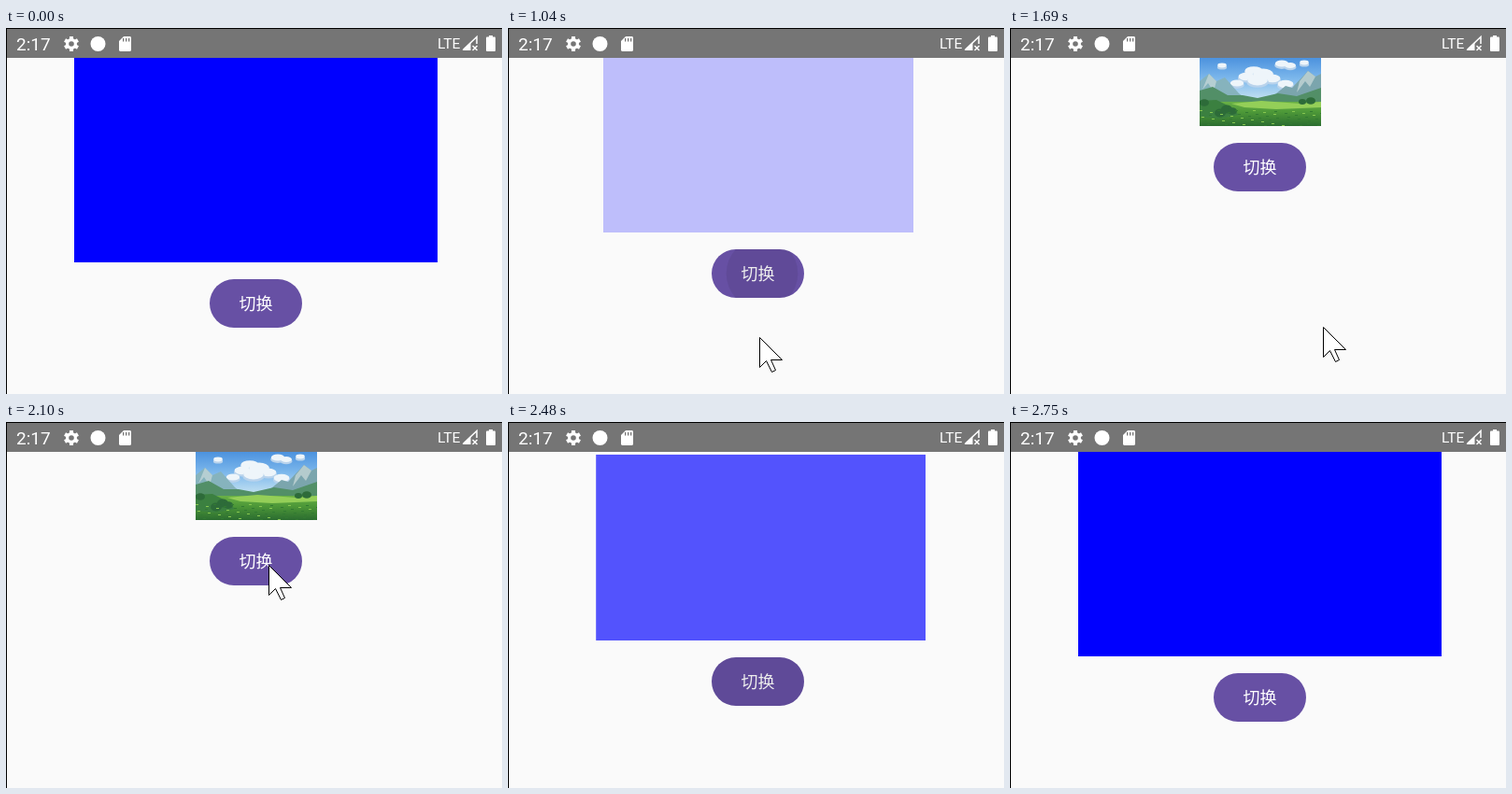
An HTML page with a canvas for the animation above (3390 ms loop, 531 by 392 pixels).

```html
<!DOCTYPE html>
<html lang="zh">
<head>
<meta charset="utf-8">
<title>切换</title>
<style>
html, body { margin: 0; width: 100%; height: 100%; overflow: hidden; background: #fafafa; }
canvas { display: block; }
</style>
</head>
<body>
<canvas id="stage" width="531" height="392"></canvas>
<script>
const ctx = document.getElementById('stage').getContext('2d');
const LOOP = 3390, TOP = 32, MID = 267.5;
const BIG = { w: 389, h: 219 }, SMALL = { w: 130, h: 73 };

const TICKS = [0,
  370, 420, 460, 510, 550, 600, 660, 710, 760, 800,
  990, 1030, 1080, 1120, 1170, 1220, 1260, 1310, 1350, 1400,
  1690, 1740, 1780, 1830, 1870, 1920, 1970, 2010, 2060, 2100, 2150,
  2250, 2290, 2340, 2390, 2430, 2480, 2520, 2570, 2610, 2660, 2700, 2750];

// Pointer visits: [time, x, y]
const VISITS = [
  { end: 1120, keys: [[370, 247, 386], [460, 245, 360], [600, 259, 320], [710, 270, 299],
    [800, 272, 293], [990, 272, 298], [1080, 266, 372]] },
  { end: 2430, keys: [[1690, 335, 320], [1780, 328, 295], [1920, 303, 215], [2060, 283, 160],
    [2150, 279, 145], [2250, 279, 147], [2290, 281, 175], [2340, 285, 270], [2390, 289, 339]] }
];
const PRESSES = [{ at: 985, x: 54, y: 26 }, { at: 2245, x: 62, y: 24 }];
const GROW_CLOCK = [[2297, 0], [2390, 83], [2480, 184], [2750, 454]];

const clamp = v => Math.max(0, Math.min(1, v));
const mix = (a, b, k) => a + (b - a) * k;

function keyed(keys, t, col = 1) {
  if (t <= keys[0][0]) return keys[0][col];
  for (let i = 1; i < keys.length; i++) {
    const a = keys[i - 1], b = keys[i];
    if (t <= b[0]) return mix(a[col], b[col], (t - a[0]) / (b[0] - a[0]));
  }
  return keys[keys.length - 1][col];
}

// cubic-bezier(.4, 0, .2, 1)
function ease(p) {
  p = clamp(p);
  let lo = 0, hi = 1;
  for (let i = 0; i < 20; i++) {
    const s = (lo + hi) / 2, r = 1 - s;
    if (1.2 * r * r * s + 0.6 * r * s * s + s * s * s < p) lo = s; else hi = s;
  }
  return lo * lo * (3 - 2 * lo);
}

// Critically damped spring, stiffness 400
const spring = ms => ms <= 0 ? 0 : 1 - (1 + ms / 50) * Math.exp(-ms / 50);

function poly(c, pts, fill) {
  c.beginPath();
  pts.forEach(([x, y]) => c.lineTo(x, y));
  c.closePath();
  c.fillStyle = fill;
  c.fill();
}

function disc(c, x, y, rx, ry, fill) {
  c.beginPath();
  c.ellipse(x, y, rx, ry, 0, 0, 7);
  c.fillStyle = fill;
  c.fill();
}

function fade(c, y0, y1, ...stops) {
  const g = c.createLinearGradient(0, y0, 0, y1);
  stops.forEach((s, i) => g.addColorStop(i / (stops.length - 1), s));
  return g;
}

function makeMeadow() {
  const cv = document.createElement('canvas');
  cv.width = SMALL.w;
  cv.height = SMALL.h;
  const c = cv.getContext('2d');
  c.fillStyle = fade(c, 0, 45, '#4c92de', '#7db8ec', '#c4e2f2');
  c.fillRect(0, 0, 130, 73);
  for (const [x, y, r] of [[58, 14, 8], [68, 17, 9], [50, 20, 7], [78, 22, 7], [62, 24, 9],
    [88, 6, 6], [97, 8, 5], [40, 27, 6], [92, 28, 7], [24, 8, 4], [112, 5, 4]]) {
    disc(c, x, y + 2, r * 1.3, r * .65, '#b9d3ec');
    disc(c, x, y, r * 1.2, r * .6, '#eef5fa');
  }
  poly(c, [[0, 25], [10, 17], [18, 25], [27, 21], [42, 38], [52, 45], [0, 48]], '#86b3bd');
  poly(c, [[10, 17], [18, 25], [15, 36], [9, 27], [3, 34]], '#b5ced2');
  poly(c, [[76, 43], [92, 30], [99, 32], [116, 14], [124, 20], [130, 17], [130, 48], [76, 48]], '#7ba5ad');
  poly(c, [[116, 14], [124, 20], [118, 31], [113, 25], [104, 37], [107, 25]], '#b4cbcd');
  poly(c, [[0, 35], [14, 31], [30, 40], [46, 40], [62, 43], [84, 38], [104, 41], [130, 32], [130, 55], [0, 55]], '#528f67');
  c.fillStyle = fade(c, 43, 73, '#73b94b', '#4d9838', '#2b6c30');
  c.fillRect(0, 47, 130, 26);
  poly(c, [[34, 49], [66, 46], [108, 49], [130, 47], [130, 53], [82, 55], [48, 53]], '#94cf58');
  poly(c, [[0, 46], [18, 45], [32, 52], [42, 61], [22, 65], [0, 63]], '#3b8040');
  for (const [x, y, r] of [[29, 55, 6], [35, 57, 5], [22, 59, 6], [5, 48, 5], [110, 47, 4], [119, 46, 5]])
    disc(c, x, y, r, r * .75, '#2d6b39');
  for (let i = 0; i < 60; i++) {
    c.fillStyle = i % 3 ? '#327a31' : '#87c650';
    c.fillRect((i * 47) % 130, 56 + (i * 29) % 17, 3, 1);
  }
  return cv;
}
const meadow = makeMeadow();

function panel(size, left, alpha, scale) {
  if (alpha <= 0) return;
  ctx.save();
  ctx.globalAlpha = alpha;
  ctx.translate(left + size.w / 2, TOP + size.h / 2);
  ctx.scale(scale, scale);
  if (size === BIG) {
    ctx.fillStyle = '#00f';
    ctx.fillRect(-size.w / 2, -size.h / 2, size.w, size.h);
  } else {
    ctx.drawImage(meadow, -size.w / 2, -size.h / 2);
  }
  ctx.restore();
}

// Returns the bottom edge of the switching area
function content(t) {
  const back = t >= 2250;
  const ms = back ? keyed(GROW_CLOCK, t) : Math.max(0, t - 986);
  const [from, to] = back ? [SMALL, BIG] : [BIG, SMALL];
  const k = spring(ms);
  const w = Math.round(mix(from.w, to.w, k)), h = Math.round(mix(from.h, to.h, k));
  const left = Math.round(MID - w / 2);
  const shown = ease((ms - 90) / 220);
  ctx.save();
  ctx.beginPath();
  ctx.rect(left, TOP, w, h);
  ctx.clip();
  panel(from, left, 1 - ease(ms / 90), 1);
  panel(to, left, shown, 0.92 + 0.08 * shown);
  ctx.restore();
  return TOP + h;
}

function button(t, y) {
  ctx.save();
  ctx.translate(218, y);
  ctx.beginPath();
  ctx.roundRect(0, 0, 99, 52, 26);
  ctx.fillStyle = '#6750a4';
  ctx.fill();
  ctx.clip();
  ctx.fillStyle = '#fff';
  ctx.font = '18px "Noto Sans CJK SC", "Noto Sans CJK", sans-serif';
  ctx.textAlign = 'center';
  ctx.fillText('切换', 49.5, 33);
  for (const p of PRESSES) {
    const a = t - p.at;
    if (a < 0 || a > 350) continue;
    const dim = 0.12 * Math.min(clamp(a / 75), clamp((350 - a) / 190));
    const r = mix(20, 70, ease(a / 150));
    disc(ctx, p.x, p.y, r, r, `rgba(0,0,0,${dim})`);
  }
  ctx.restore();
}

function statusBar() {
  ctx.fillStyle = '#757575';
  ctx.fillRect(0, 0, 531, TOP);
  ctx.fillStyle = ctx.strokeStyle = '#fff';
  ctx.textAlign = 'left';
  ctx.font = '19px Roboto, sans-serif';
  ctx.fillText('2:17', 11, 24);
  ctx.font = '15.5px Roboto, sans-serif';
  ctx.fillText('LTE', 462, 22);

  // gear
  ctx.save();
  ctx.translate(70, 17);
  for (let i = 0; i < 6; i++) {
    ctx.fillRect(-2, -8, 4, 5);
    ctx.rotate(Math.PI / 3);
  }
  disc(ctx, 0, 0, 6, 6, '#fff');
  disc(ctx, 0, 0, 2.8, 2.8, '#757575');
  ctx.restore();

  disc(ctx, 98.5, 17, 8, 8, '#fff');

  // memory card
  poly(ctx, [[126, 9], [133, 9], [134, 10], [134, 24], [133, 25], [122, 25], [121, 24], [121, 14]], '#fff');
  ctx.fillStyle = '#757575';
  for (const x of [125, 128, 131]) ctx.fillRect(x, 11, 1.3, 3.5);

  // signal
  poly(ctx, [[488.5, 24], [497.5, 24], [497.5, 15]], '#fff');
  ctx.lineWidth = 1.5;
  ctx.beginPath();
  ctx.moveTo(489.5, 23.3);
  ctx.lineTo(504, 9.5);
  ctx.lineTo(504, 17);
  ctx.moveTo(499.5, 19);
  ctx.lineTo(504.5, 24);
  ctx.moveTo(504.5, 19);
  ctx.lineTo(499.5, 24);
  ctx.stroke();

  // battery
  ctx.fillStyle = '#fff';
  ctx.fillRect(517, 8, 4, 3);
  ctx.beginPath();
  ctx.roundRect(514, 9.5, 10, 15.5, 1);
  ctx.fill();
}

function pointer(t) {
  const v = VISITS.find(v => t >= v.keys[0][0] && t < v.end);
  if (!v) return;
  ctx.save();
  ctx.translate(Math.round(keyed(v.keys, t, 1)) + .5, Math.round(keyed(v.keys, t, 2)) + .5);
  poly(ctx, [[0, 0], [0, 32], [7, 25], [13, 37], [17, 35], [12, 24], [24, 24]], '#fff');
  ctx.strokeStyle = '#000';
  ctx.lineWidth = 1;
  ctx.stroke();
  ctx.restore();
}

function draw(t) {
  ctx.fillStyle = '#fafafa';
  ctx.fillRect(0, 0, 531, 392);
  button(t, content(t) + 18);
  statusBar();
  pointer(t);
  ctx.fillStyle = '#000';
  ctx.fillRect(0, 0, 531, 1);
  ctx.fillRect(0, 0, 1, 392);
}

const start = performance.now();
function tick() {
  const now = (performance.now() - start) % LOOP;
  draw(TICKS.findLast(x => x <= now));
  requestAnimationFrame(tick);
}
tick();
</script>
</body>
</html>
```
